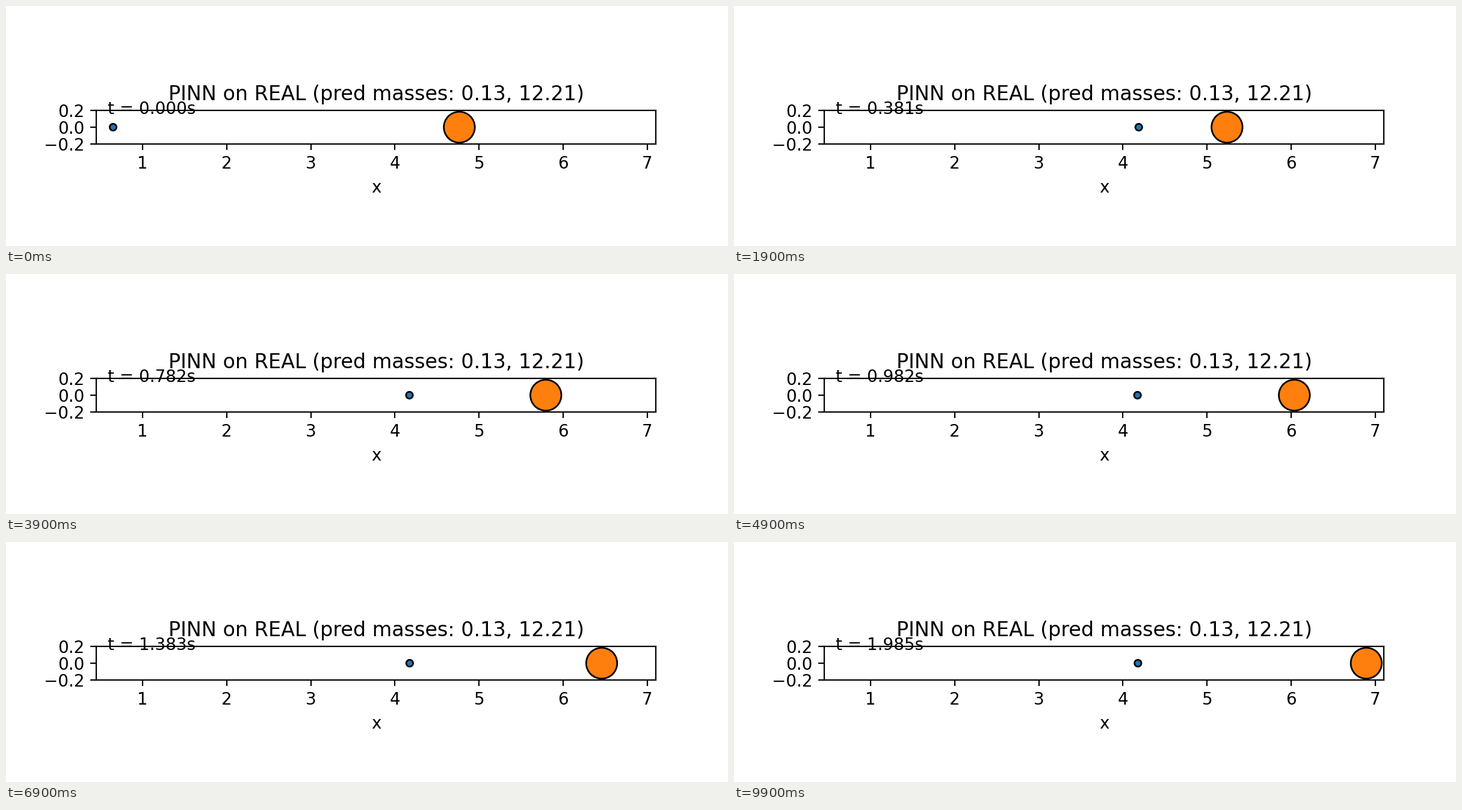
Write a matplotlib script that moves like this. It is 1200x400 px and loops after 10000 ms.

```python
import numpy as np
import matplotlib.pyplot as plt
from matplotlib.animation import FuncAnimation
from matplotlib.patches import Circle

FRAMES = 100
T_END = 1.985
MASSES = (0.13, 12.21)
START = (0.65, 4.765)
PAD = 0.2

step = np.arange(FRAMES)
times = np.linspace(0, T_END, FRAMES)


def ramp(width, power):
    """Smooth rise from 0 to 1 over about two widths."""
    return 1 - np.exp(-(step / width) ** power)


def light_path():
    """Dash to the point of impact, slight overshoot, then almost at rest."""
    overshoot = 1 + 0.032 * np.exp(-(step / 14) ** 2)
    return START[0] + (3.518 + 0.0001 * step) * overshoot * ramp(4.2, 1.6)


def heavy_path():
    """Pushed off by the impact, then slowed by friction."""
    since = np.maximum(step - 4, 0)
    glide = 0.03328 * since - 0.0001115 * since ** 2
    braking = 0.0286 * (step / step[-1]) ** 12
    return START[1] + glide * ramp(9.5, 2.4) - braking


paths = [light_path(), heavy_path()]

plt.rcParams["font.family"] = "DejaVu Sans"
fig, ax = plt.subplots(figsize=(6, 2), dpi=200)
ax.set_aspect("equal")
ax.set_xlim(START[0] - PAD, 7.1)
ax.set_ylim(-PAD, PAD)
ax.set_xticks(range(1, 8))
ax.set_yticks([-PAD, 0, PAD])
ax.set_xlabel("x")
ax.set_title(f"PINN on REAL (pred masses: {MASSES[0]:.2f}, {MASSES[1]:.2f})")

bodies = []
for mass, path, color in zip(MASSES, paths, ("C0", "C1")):
    ball = Circle((path[0], 0), 0.08 * np.cbrt(mass), fc=color, ec="k", lw=1)
    bodies.append(ax.add_patch(ball))
clock = ax.text(0.02, 0.9, "", transform=ax.transAxes)


def update(n):
    for body, path in zip(bodies, paths):
        body.center = (path[n], 0)
    clock.set_text(f"t = {times[n]:.3f}s")
    return [*bodies, clock]


anim = FuncAnimation(fig, update, frames=FRAMES, interval=100,
                     init_func=lambda: update(0), repeat=True)
plt.show()
```
